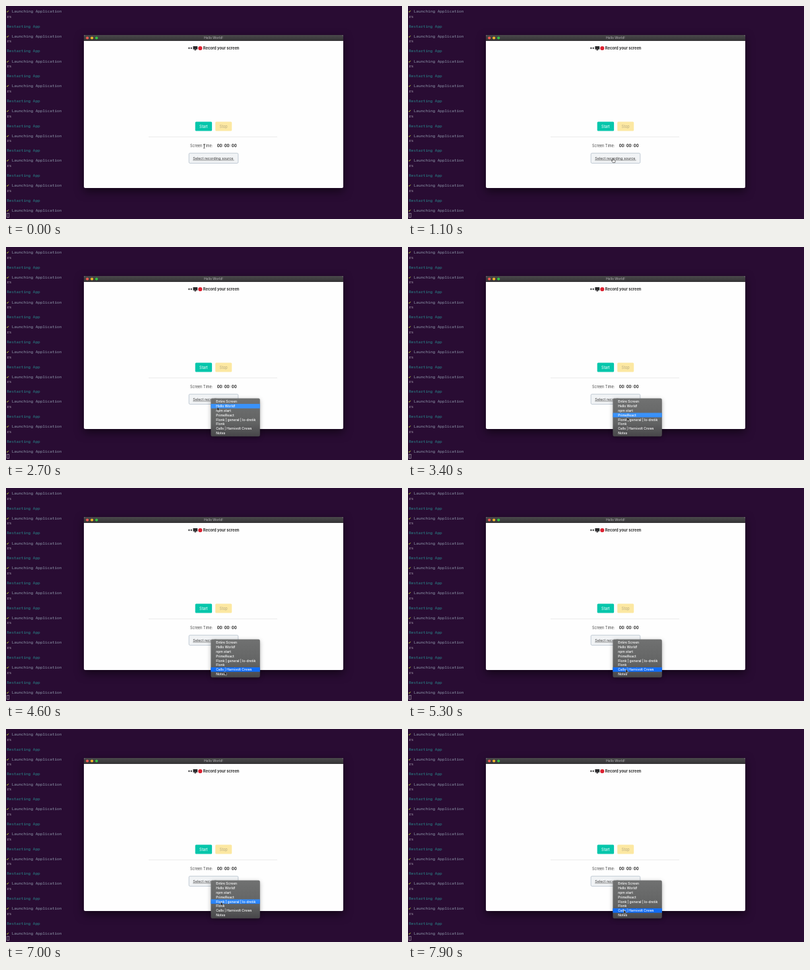
These frames come from a looping animation (600x323 px, 8 s). An HTML page:

```html
<!DOCTYPE html>
<html lang="en">
<head>
<meta charset="utf-8">
<title>Screen recorder</title>
<style>
  html, body { margin: 0; width: 100%; height: 100%; overflow: hidden; background: #290c33; }
  svg { display: block; width: 600px; height: 323px; }
  text { font-family: Inter, "Open Sans", sans-serif; font-size: 5.6px; fill: #454545; white-space: pre; }
  .mid { text-anchor: middle; }
  .bold { font-weight: 700; font-size: 5.75px; fill: #303030; }
  #terminal text { font-family: "Noto Sans Mono", "DejaVu Sans Mono", monospace; font-size: 6px; }
  #terminal .tick { font-family: "DejaVu Sans Mono", "DejaVu Sans", monospace; fill: #b4cf38; }
  #terminal .launch { fill: #8f9aac; }
  #terminal .input { fill: #a9a3b0; }
  #terminal .restart { fill: #298b8d; }
  #items text { font-size: 5px; font-weight: 500; fill: #fff; }
  .window { filter: drop-shadow(0 5px 7px rgba(0, 0, 0, .55)); }
  .menu { filter: drop-shadow(0 2px 3px rgba(0, 0, 0, .3)); }
</style>
</head>
<body>
<svg viewBox="0 0 600 323">
  <defs>
    <linearGradient id="bar" x2="0" y2="1">
      <stop stop-color="#4a494b"/><stop offset="1" stop-color="#343335"/>
    </linearGradient>
    <linearGradient id="glass" x2="0" y2="1">
      <stop stop-color="#707171"/><stop offset=".65" stop-color="#626363"/><stop offset="1" stop-color="#474649"/>
    </linearGradient>
    <linearGradient id="blue" gradientUnits="userSpaceOnUse" x1="0" x2="0" y1="255" y2="275">
      <stop stop-color="#3a92f9"/><stop offset="1" stop-color="#0f6bf6"/>
    </linearGradient>
  </defs>

  <rect width="600" height="323" fill="#290c33"/>
  <g id="terminal"></g>
  <rect x="1.5" y="314.4" width="3.2" height="6.2" fill="none" stroke="#9a92a2" stroke-width=".7"/>

  <g class="window">
    <rect x="118" y="44" width="393" height="232" rx="2" fill="#fefefe"/>
    <path d="M118 53V46q0-2 2-2H509q2 0 2 2V53Z" fill="url(#bar)"/>
  </g>
  <circle cx="123.2" cy="48.5" r="2.1" fill="#f45c52"/>
  <circle cx="130.2" cy="48.5" r="2.1" fill="#f3b62c"/>
  <circle cx="137.2" cy="48.5" r="2.1" fill="#35c244"/>
  <text class="mid" x="314.3" y="50.4" style="font-size:5px;fill:#b9b8ba">Hello World!</text>

  <g fill="#2b2b2d">
    <ellipse cx="277.4" cy="63.9" rx="1" ry="1.3"/>
    <ellipse cx="280.7" cy="63.9" rx="1" ry="1.3"/>
    <rect x="283.4" y="61.1" width="6.8" height="4.7" rx=".5"/>
    <path d="M286 65.8h1.6l.9 1.5h-3.4Z"/>
  </g>
  <circle cx="294.3" cy="64" r="3.1" fill="#dc2231"/>
  <text class="bold" x="298.8" y="66">Record your screen</text>

  <rect x="286.7" y="175.5" width="25.4" height="14" rx="1.5" fill="#06c6ab"/>
  <text class="mid" x="299.4" y="184.7" style="fill:#fff">Start</text>
  <rect x="317.2" y="175.5" width="25" height="14" rx="1.5" fill="#fce8a2"/>
  <text class="mid" x="329.7" y="184.7" style="fill:#b9ab80">Stop</text>
  <rect x="216" y="198" width="195" height=".8" fill="#e6e6e6"/>
  <text x="279" y="214.1" style="font-size:5.5px">Screen Time:</text>
  <text class="bold" x="319.7" y="214.1">00: 00: 00</text>

  <rect x="277.2" y="223.2" width="74.6" height="15.2" rx="1.6" fill="#f1f3f5" stroke="#b3bfcb" stroke-width=".8"/>
  <text x="283.2" y="232.9" style="font-size:5.45px;fill:#363636">Select recording source</text>
  <rect x="283.2" y="233.7" width="62.4" height=".5" fill="#363636"/>

  <g id="menu">
    <rect class="menu" x="310.4" y="229.5" width="74.4" height="57.8" rx="2.2" fill="url(#glass)"/>
    <rect id="mark" x="310.4" width="74.4" height="6.8" fill="url(#blue)"/>
    <g id="items"></g>
  </g>

  <g id="pointer">
    <path id="beam" d="M-1.2-2.8Q0-2.8 0-2Q0-2.8 1.2-2.8M0-2V2M-1.2 2.8Q0 2.8 0 2Q0 2.8 1.2 2.8" fill="none" stroke="#333" stroke-width=".7"/>
    <path id="arrow" d="M0 0V5.6L1.3 4.4L2.2 6.4L3.1 6L2.2 4.1H4Z" fill="#111" stroke="#e8e8e8" stroke-width=".4"/>
    <path id="hand" d="M-.6 0Q0-.7.6 0V2L3 2.6Q3.6 2.8 3.5 3.6L3 6H-.4L-2.2 3.6Q-2-.2-.6 3.4Z" fill="#fff" stroke="#222" stroke-width=".6"/>
  </g>
</svg>
<script>
  const LOOP = 8000, STEP = 100, MENU_AT = 1700;
  const ROW = 6.8, TOP = 231.1;
  const labels = ["Entire Screen", "Hello World!", "npm start", "PrimeReact",
    "Flonk | general | lo-dretik", "Flonk", "Calls | Harnivolt Crews", "Notes"];
  // time, x, y of the pointer tip
  const path = [
    [0, 300.3, 213], [200, 300.3, 213], [900, 310.5, 231.5], [1500, 311, 231],
    [2200, 311, 231], [3300, 332, 258], [3500, 332, 258], [4400, 331, 278.3],
    [5000, 331, 278.3], [6200, 324.6, 255], [6500, 324.6, 255], [7700, 327, 274.5], [LOOP, 327, 274.5]
  ];
  const el = id => document.getElementById(id);

  function addText(parent, cls, x, y, value) {
    const node = document.createElementNS("http://www.w3.org/2000/svg", "text");
    node.setAttribute("class", cls);
    node.setAttribute("x", x);
    node.setAttribute("y", y);
    node.textContent = value;
    parent.append(node);
  }

  for (let i = 0; i < 9; i++) {
    const y = 10.1 + i * 37.73, log = el("terminal");
    addText(log, "tick", 1, y, "✔");
    addText(log, "launch", 8.7, y, "Launching Application");
    if (i < 8) {
      addText(log, "input", 1.2, y + 7.55, "rs");
      addText(log, "restart", 1.2, y + 22.64, "Restarting App");
    }
  }
  labels.forEach((label, i) => addText(el("items"), "", 318.2, TOP + ROW * (i + .5) + 1.8, label));

  function pointerAt(t) {
    const i = path.findIndex(p => p[0] > t);
    const [t0, x0, y0] = path[i - 1], [t1, x1, y1] = path[i];
    const u = (t - t0) / (t1 - t0), k = u * u * (3 - 2 * u);
    return [x0 + (x1 - x0) * k, y0 + (y1 - y0) * k];
  }

  const show = (id, on) => el(id).style.display = on ? "" : "none";

  function draw(now) {
    const t = Math.floor(now % LOOP / STEP) * STEP;
    const [x, y] = pointerAt(t);
    const open = t >= MENU_AT;
    const row = Math.floor((y - TOP) / ROW);
    show("menu", open);
    show("mark", row >= 0);
    el("mark").setAttribute("y", TOP + ROW * row);
    show("beam", !open && y < 216);
    show("hand", !open && y >= 223);
    show("arrow", open || y >= 216 && y < 223);
    el("pointer").setAttribute("transform", `translate(${x} ${y})`);
  }

  const start = performance.now();
  function tick() {
    draw(performance.now() - start);
    requestAnimationFrame(tick);
  }
  tick();
</script>
</body>
</html>
```
